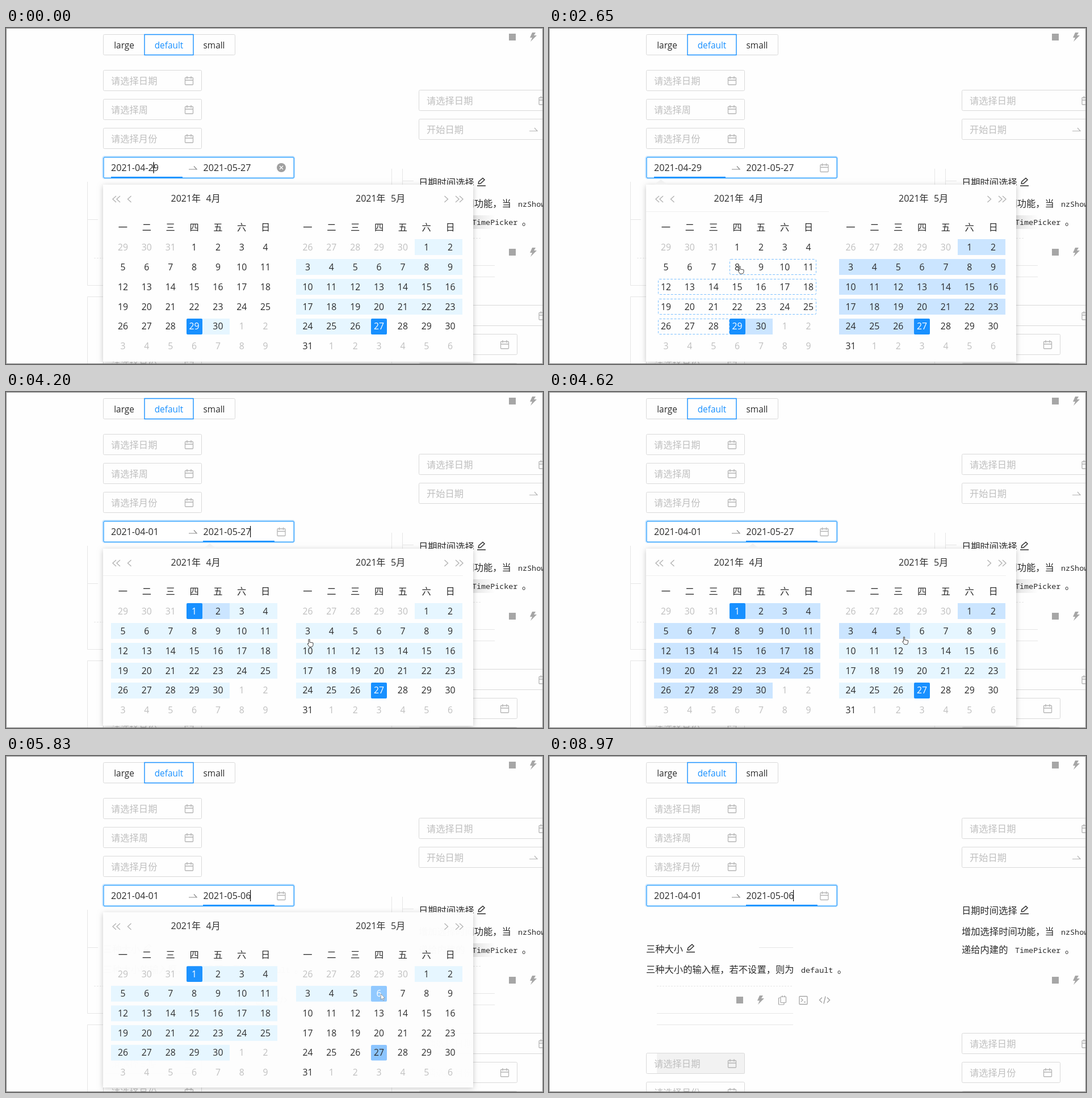
Recreate the animation shown at these times as an HTML page with a canvas. Size 946 px wide and 592 px high, loop 9070 ms.

```html
<!DOCTYPE html>
<html lang="zh-CN">
<head>
<meta charset="utf-8">
<title>Range picker</title>
<style>
html, body { margin: 0; width: 100%; height: 100%; overflow: hidden; background: #fefefe; }
canvas { display: block; }
</style>
</head>
<body>
<canvas id="stage" width="946" height="592"></canvas>
<script>
const LOOP = 9070, BLINK = 530;
const START_CLICK = 3800, END_CLICK = 5710, CLOSING = 5830, CLOSED = 6080;
const BLUE = '#1890ff', INK = '#2b2b2b', MUTED = '#bfbfbf', LINE = '#d9d9d9', ICON = '#a6a6a6';
const SANS = '"Open Sans", "Noto Sans CJK SC", "Noto Sans CJK", sans-serif';
const MONO = '"Noto Sans Mono", monospace';
const COL = 41.85, ROW = 34.9, TOP = 386;
const WEEKDAYS = '一二三四五六日';

// Places where the pointer rests: time, x, y.
const STOPS = [
  [150, 260, 246], [900, 375, 420], [1700, 208, 420], [2650, 335, 420],
  [3500, 331, 388], [4050, 372, 392], [4200, 533, 436], [4550, 619, 431],
  [5100, 740, 448], [5460, 660, 419], [7400, 664, 421], [8290, 892, 605]
];

const dayNumber = date => Math.round((date - new Date(2021, 3, 0, 12)) / 864e5);
const START_A = dayNumber(new Date(2021, 3, 29, 12)), START_B = dayNumber(new Date(2021, 3, 1, 12));
const END_A = dayNumber(new Date(2021, 4, 27, 12)), END_B = dayNumber(new Date(2021, 4, 6, 12));

// A month as 42 cells with their places and running day numbers.
const months = [3, 4].map((month, side) => {
  const x = 206 + 325.5 * side;
  const lead = (new Date(2021, month, 1).getDay() + 6) % 7;
  const cells = Array.from({ length: 42 }, (_, i) => {
    const date = new Date(2021, month, i - lead + 1, 12);
    return {
      row: Math.floor(i / 7), cx: x + i % 7 * COL, cy: TOP + Math.floor(i / 7) * ROW,
      day: dayNumber(date), label: date.getDate(), inside: date.getMonth() === month
    };
  });
  return { x, cells, name: `${month + 1}月` };
});

const g = document.getElementById('stage').getContext('2d');

function text(s, x, y, { color = INK, size = 16.3, align = 'left', font = SANS, weight = 400 } = {}) {
  g.font = `${weight} ${size}px ${font}`;
  g.textAlign = align;
  g.fillStyle = color;
  g.fillText(s, x, y + 5.8);
}
const code = (s, x, y) => text(s, x, y - .6, { size: 13.4, font: MONO });

function rect(x, y, w, h, color) {
  g.fillStyle = color;
  g.fillRect(x, y, w, h);
}

function path(color, width, ...lines) {
  g.strokeStyle = color;
  g.lineWidth = width;
  g.beginPath();
  for (const p of lines)
    for (let i = 0; i < p.length; i += 2) g[i ? 'lineTo' : 'moveTo'](p[i], p[i + 1]);
  g.stroke();
}

function shape(color, points) {
  g.fillStyle = color;
  g.beginPath();
  for (let i = 0; i < points.length; i += 2) g.lineTo(points[i], points[i + 1]);
  g.closePath();
  g.fill();
}

function box(x, y, w, h, color = LINE, r = 2, width = 1) {
  g.strokeStyle = color;
  g.lineWidth = width;
  g.beginPath();
  g.roundRect(x + .5, y + .5, w, h, r);
  g.stroke();
}

function at(x, y, draw) {
  g.save();
  g.translate(x, y);
  draw();
  g.restore();
}

const calendarIcon = (x, y) => at(x, y, () => {
  box(-7.5, -6, 14, 12.5, '#b5b5b5', 1, 1.3);
  path('#b5b5b5', 1.3, [-7, -1, 7, -1], [-3.5, -8, -3.5, -3.5], [3.5, -8, 3.5, -3.5]);
});

const swapIcon = (x, y, color) => at(x, y, () => path(color, 1.2, [-7, 2.5, 7, 2.5, 2, -3]));

const pencilIcon = (x, y) => at(x, y, () =>
  path(INK, 1.4, [-7, 6.5, 8, 6.5], [-5, 3, -4, -1, 3, -7, 6, -4, -1, 2.5, -5, 3]));

function toolIcons(x, y, color) {
  rect(x - 6, y - 6, 12, 12, color);
  at(x + 37, y, () => shape(color, [-2, -8, 4, -8, 1, -3, 6, -3, -5, 8, -2, 1, -6, 1]));
}

function codeIcons(x, y, color) {
  at(x, y, () => {
    box(-7, -4.5, 9.5, 12, color, 1, 1.2);
    rect(-3.5, -7, 10, 11, '#fefefe');
    box(-3.5, -6.5, 9.5, 10.5, color, 1, 1.2);
    path(color, 1.2, [0, -8, 0, -5], [4, -8, 4, -5]);
  });
  at(x + 37, y, () => {
    box(-7.5, -7, 14, 14, color, 1, 1.3);
    path(color, 1.3, [-4, -3, -1, 0, -4, 3], [1, 3.5, 4, 3.5]);
  });
  at(x + 74, y, () => path(color, 1.5, [-4, -4.5, -8.5, 0, -4, 4.5], [5, -4.5, 9.5, 0, 5, 4.5], [2, -6.5, -1, 6.5]));
}

function field(x, y, label, width = 173, icon = width - 21.5) {
  box(x, y, width, 36);
  text(label, x + 14, y + 19, { color: MUTED });
  if (icon) calendarIcon(x + icon, y + 19);
}

// Card outlines, seen only inside the given horizontal span.
function cards(left, right) {
  const c = '#e6e6e6';
  g.save();
  g.beginPath();
  g.rect(left, 248, right - left, 344);
  g.clip();
  path(c, 1, [143.5, 271, 143.5, 453.5, 679.5, 453.5, 679.5, 248],
    [143.5, 592, 143.5, 473.5, 679.5, 473.5, 679.5, 592],
    [143, 337.5, 162, 337.5], [370, 337.5, 651, 337.5],
    [698.5, 248, 698.5, 418.5, 861, 418.5], [698, 269.5, 718, 269.5], [698, 438.5, 861, 438.5]);
  g.setLineDash([3, 2]);
  path(c, 1, [155, 405.5, 651, 405.5], [718, 370.5, 837, 370.5]);
  g.restore();
}

function page(t) {
  rect(0, 0, 946, 592, '#fefefe');
  if (t < CLOSED) {
    cards(143, 861);
    const shade = g.createLinearGradient(823, 0, 861, 0);
    shade.addColorStop(0, '#e4e4e4');
    shade.addColorStop(1, '#fefefe');
    rect(823, 330, 38, 24, shade);
  }
  if (t > 8000) {
    cards(190, 430);
    rect(190, 524, 155, 36, '#f2f2f2');
  }

  box(171, 11, 232, 36);
  box(243.5, 11, 86, 36, BLUE, 0, 1.4);
  const button = { size: 15.4, align: 'center' };
  text('large', 208, 30, button);
  text('default', 287, 30, { ...button, color: BLUE });
  text('small', 366.5, 30, button);

  ['日期', '周', '月份'].forEach((unit, i) => field(171, 74 + 51 * i, '请选择' + unit));
  ['日期', '月份'].forEach((unit, i) => field(171, 523 + 51 * i, '请选择' + unit));
  for (const y of [109, 488]) field(727, y, '请选择日期', 230, 219);
  field(727, 160, '开始日期', 230, 0);
  swapIcon(929, 179, '#b5b5b5');
  field(727, 539, '请选择月份');
  field(727, 590, '');

  text('三种大小', 171, 340);
  pencilIcon(249, 339);
  text('三种大小的输入框，若不设置，则为', 171, 376);
  code('default', 444, 377);
  text('。', 508, 376);
  text('日期时间选择', 727, 272.5);
  pencilIcon(837, 271.5);
  text('增加选择时间功能，当', 727, 309);
  code('nzShowTime', 902, 309.5);
  text('递给内建的', 727, 341);
  code('TimePicker', 821, 342);
  text('。', 909, 341);

  for (const y of [16, 395]) toolIcons(892, y, ICON);
  const tint = t < 7520 ? '#7d7d7d' : ICON;
  toolIcons(336, 430, tint);
  codeIcons(411, 430, tint);
}

function rangeInput(t) {
  const first = t < START_CLICK;
  box(170, 226, 337.5, 38.5, 'rgba(24,144,255,.22)', 3, 2.5);
  rect(171, 227, 337, 38, '#fff');
  box(171.5, 227.3, 335.2, 36.4, '#40a9ff', 2, 1.5);
  text(first ? '2021-04-29' : '2021-04-01', 185, 246.5, { size: 16.1 });
  text(t < CLOSING ? '2021-05-27' : '2021-05-06', 347.5, 246.5, { size: 16.1 });
  swapIcon(329, 246.5, '#8c8c8c');
  rect(first ? 185 : 347, 262, 126, 2, BLUE);
  if (t < 300) {
    g.fillStyle = '#a0a0a0';
    g.beginPath();
    g.arc(485, 246, 8, 0, 7);
    g.fill();
    path('#fff', 1.4, [482, 243, 488, 249], [488, 243, 482, 249]);
  } else calendarIcon(485, 246.5);
  const focused = first ? 0 : t < END_CLICK ? START_CLICK : END_CLICK;
  if (Math.floor((t - focused) / BLINK) % 2 === 0) rect(first ? 259.5 : 430, 236, 1.2, 20, '#111');
}

function pointerAt(t) {
  const next = STOPS.findIndex(s => s[0] > t);
  if (next < 1) return STOPS.at(next).slice(1);
  const [t0, x0, y0] = STOPS[next - 1], [t1, x1, y1] = STOPS[next];
  const k = (t - t0) / (t1 - t0), ease = k * k * (3 - 2 * k);
  return [x0 + (x1 - x0) * ease, y0 + (y1 - y0) * ease];
}

// The highlight trails the pointer a little.
function hoveredDay(t) {
  const [x, y] = pointerAt(t - 150);
  const near = c => c.inside && Math.abs(c.cx - x) <= COL / 2 && Math.abs(c.cy - y) <= ROW / 2;
  return months.flatMap(m => m.cells).find(near)?.day;
}

function daySquare(c, color) {
  g.fillStyle = color;
  g.beginPath();
  g.roundRect(Math.round(c.cx) - 14, Math.round(c.cy) - 14, 28, 28, 2);
  g.fill();
}

// Dashed outline around the days the range would gain, one box per week.
function extension(cells, from, to) {
  g.setLineDash([4, 2.5]);
  for (let row = 0; row < 6; row++) {
    const week = cells.filter(c => c.row === row && c.inside && c.day >= from && c.day < to);
    if (!week.length) continue;
    const a = week[0], b = week.at(-1);
    const left = Math.round(a.cx) - 14, right = Math.round(b.cx) + (b.day === to - 1 ? 28 : 14);
    box(left, Math.round(a.cy) - 14, right - left - 1, 27, '#7ec1ff');
  }
  g.setLineDash([]);
}

function monthGrid({ x, cells, name }, t) {
  const picking = t < START_CLICK, done = t >= CLOSING;
  const start = picking ? START_A : START_B, end = done ? END_B : END_A;
  const hover = done ? undefined : hoveredDay(t);
  const title = { size: 16, weight: 500 };
  text('2021年', x + 84.5, 300, title);
  text(name, x + 146.5, 300, title);
  [...WEEKDAYS].forEach((s, i) => text(s, x + i * COL, 351.5, { align: 'center' }));
  if (picking && hover < start) extension(cells, hover, start);

  for (const c of cells) {
    const { cx, cy, day, inside } = c;
    let color = inside ? INK : MUTED;
    if (inside && day >= start && day <= end) {
      const left = Math.round(day === start ? cx : cx - COL / 2);
      const right = Math.round(day === end ? cx : cx + COL / 2);
      const dark = picking ? day >= hover : day <= hover;
      rect(left, Math.round(cy) - 14, right - left, 28, dark ? '#cbe5ff' : '#e6f6ff');
    }
    if (inside && (day === start || day === end)) {
      daySquare(c, done && day === end ? '#8fc8ff' : BLUE);
      color = '#fff';
    } else if (inside && done && day === END_A) daySquare(c, '#8ac4ff');
    text(c.label, cx, cy, { color, size: 15.8, align: 'center' });
  }
}

function panel(t) {
  // Slides up and fades once the second date is chosen.
  const gone = Math.max(0, t - CLOSING) / (CLOSED - CLOSING);
  const squash = t < CLOSING ? 0 : .01 + .19 * gone ** 3;
  g.save();
  g.globalAlpha = t < CLOSING ? 1 : .98 * (1 - gone ** 3);
  g.translate(0, 200 * squash);
  g.scale(1, 1 - squash);
  g.save();
  g.shadowColor = 'rgba(0,0,0,.22)';
  g.shadowBlur = 9;
  g.shadowOffsetY = 2;
  rect(171, 276, 652, 312, '#fefefe');
  g.restore();
  if (t > 1080 && t < CLOSING) {
    const first = t < START_CLICK, tip = first ? 197 : 359;
    shape('#f1f1f1', [tip - 12, 276, tip, 267, tip + 12, 276]);
    path('#f0f0f0', 1, [171, 323.5, first ? 493 : 805, 323.5]);
  }
  for (const x of [188, 195, 214.5]) {
    path('#b0b0b0', 1.3, [x + 6, 296, x, 301.5, x + 6, 307]);
    path('#b0b0b0', 1.3, [987 - x, 296, 993 - x, 301.5, 987 - x, 307]);
  }
  months.forEach(m => monthGrid(m, t));
  g.restore();
}

function pointer(t) {
  const [x, y] = pointerAt(t);
  const hand = t < CLOSING && y > TOP - ROW / 2;
  at(x, y, () => {
    if (y < 266) return path('#333', 1, [0, -8, 0, 8], [-2, 0, 3, 0]);
    shape('#fff', hand
      ? [0, 0, 2, 0, 2, 5, 8, 6, 8, 10, 6.5, 13, 1.5, 13, -2, 8, -1, 7, 0, 8]
      : [0, 0, 0, 10, 2.5, 8, 4, 11.5, 5.5, 11, 4, 7.5, 7, 7]);
    g.strokeStyle = hand ? '#444' : '#8a8a8a';
    g.lineWidth = hand ? 1 : .8;
    g.stroke();
  });
}

function frame(now) {
  const t = now % LOOP;
  page(t);
  rangeInput(t);
  if (t < CLOSED) panel(t);
  pointer(t);
  box(0, 0, 945, 591, '#858585', 0);
  requestAnimationFrame(frame);
}
requestAnimationFrame(frame);
</script>
</body>
</html>
```
